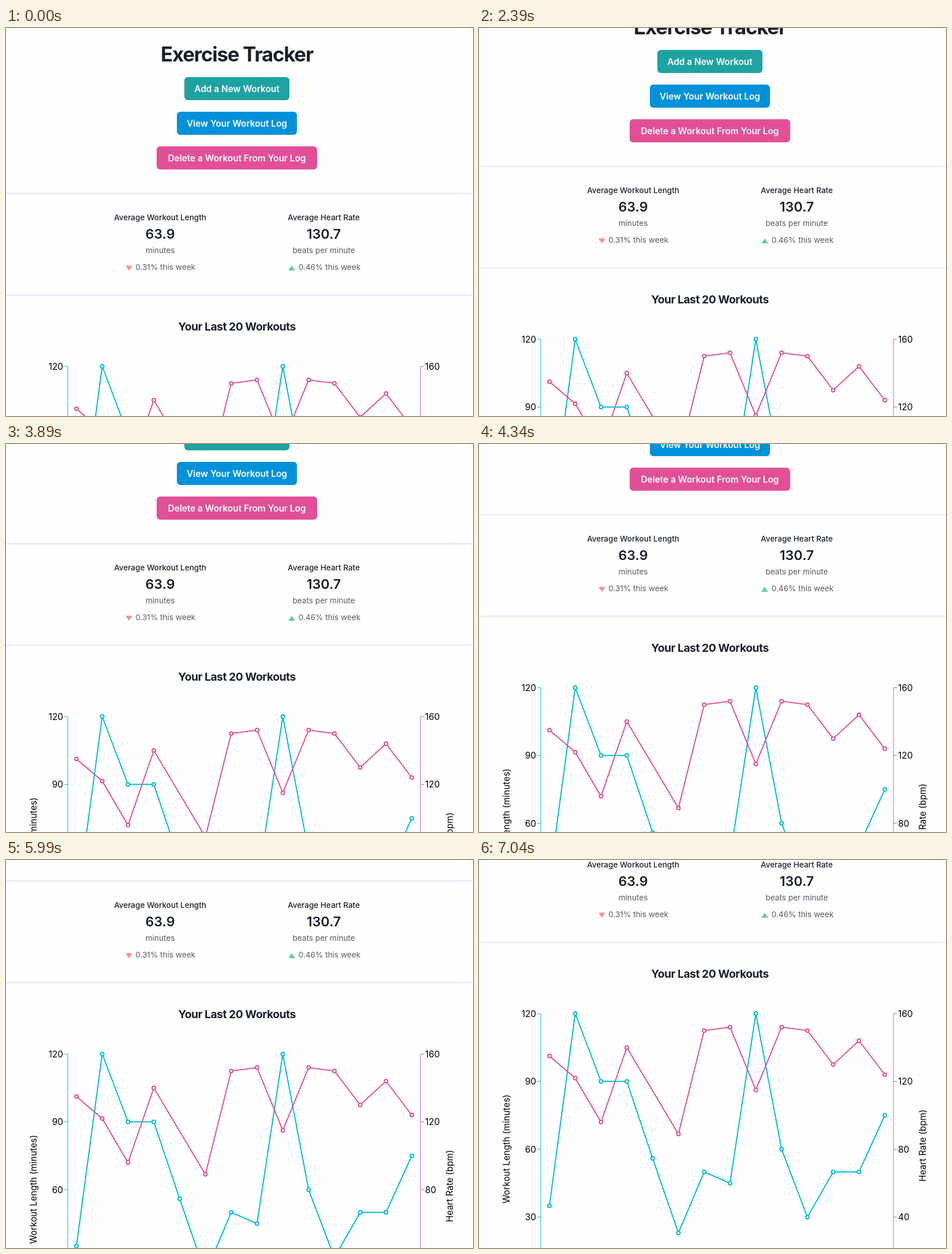
An HTML page that plays this animation: 809 px wide and 672 px high, repeating every 8 s.

```html
<!DOCTYPE html>
<html lang="en">
<head>
<meta charset="utf-8">
<title>Exercise Tracker</title>
<style>
  html, body { margin: 0; width: 100%; height: 100%; overflow: hidden; background: #fefefe; }
  svg { display: block; width: 809px; height: 672px; }
  text { font: 400 15.4px Inter, "Open Sans", sans-serif; font-optical-sizing: none; fill: #000; text-anchor: middle; }
  .title { font-size: 34.8px; font-weight: 700; letter-spacing: -1.2px; fill: #1a202c; }
  .heading { font-size: 19.3px; font-weight: 700; letter-spacing: -.48px; fill: #1a202c; }
  .button { font-weight: 600; fill: #fff; }
  .label { font-size: 13.5px; font-weight: 500; fill: #1a202c; }
  .number { font-size: 23.2px; font-weight: 600; fill: #1a202c; }
  .note { font-size: 13.6px; fill: #555b66; }
  .start { text-anchor: start; }
  .end { text-anchor: end; }
</style>
</head>
<body>
<svg viewBox="0 0 809 672"><g id="page"></g></svg>
<script>
const CYAN = '#00bcd6', PINK = '#e15097';
const TOP = 586, BOTTOM = 1056, LEFT = 107, RIGHT = 718;

const text = (x, y, str, cls = '', extra = '') =>
  `<text x="${x}" y="${y}" class="${cls}" ${extra}>${str}</text>`;

const button = (y, width, color, str) =>
  `<rect x="${400 - width / 2}" y="${y}" width="${width}" height="40" rx="6" fill="${color}"/>` +
  text(400, y + 25.7, str, 'button');

const divider = y => `<rect y="${y}" width="809" height="3" fill="#edecfb"/>`;

function stat(x, label, value, unit, change, rising) {
  const left = x - 60;
  const arrow = rising ? 'M0 420h12l-6-8.5z' : 'M0 411.5h12l-6 8.5z';
  return text(x, 333, label, 'label') + text(x, 365, value, 'number') + text(x, 390, unit, 'note') +
    `<path transform="translate(${rising ? left - 1.5 : left})" d="${arrow}" fill="${rising ? '#68cd9c' : '#ff9088'}"/>` +
    text(rising ? left + 16.2 : left + 17.2, 419, change + ' this week', 'note start');
}

const scaleY = (value, max) => BOTTOM - value / max * (BOTTOM - TOP);

// side is -1 for the left axis, 1 for the right one
function axis(x, side, max, color, label, labelX, labelY) {
  let ticks = '', path = `M${x} ${TOP}V${BOTTOM}`;
  for (let i = 0; i <= 4; i++) {
    const value = max * i / 4, y = scaleY(value, max);
    path += `M${x} ${y}h${6 * side}`;
    ticks += text(x + 8 * side, y + 5.7, value, side < 0 ? 'end' : 'start');
  }
  return `<path d="${path}" stroke="${color}" fill="none"/>` + ticks +
    text(0, 0, label, '', `transform="translate(${labelX} ${labelY}) rotate(-90)"`);
}

function series(values, max, color) {
  const points = values
    .map((v, i) => v === null ? null : [122 + i * 581 / 13, scaleY(v, max)])
    .filter(Boolean);
  return `<g stroke="${color}" stroke-width="2"><polyline fill="none" points="${points.join(' ')}"/>` +
    points.map(([x, y]) => `<circle cx="${x}" cy="${y}" r="3" fill="#fff"/>`).join('') + '</g>';
}

const page = document.getElementById('page');
page.innerHTML =
  text(400, 57.5, 'Exercise Tracker', 'title') +
  button(85, 182, '#1fa2a2', 'Add a New Workout') +
  button(145, 208, '#0091d9', 'View Your Workout Log') +
  button(205, 278, PINK, 'Delete a Workout From Your Log') +
  divider(285) +
  stat(267, 'Average Workout Length', '63.9', 'minutes', '0.31%', false) +
  stat(550.5, 'Average Heart Rate', '130.7', 'beats per minute', '0.46%', true) +
  divider(461) +
  text(400, 524, 'Your Last 20 Workouts', 'heading') +
  axis(LEFT, -1, 120, CYAN, 'Workout Length (minutes)', 53, 820.5) +
  axis(RIGHT, 1, 160, PINK, 'Heart Rate (bpm)', 774, 814.5) +
  series([35, 120, 90, 90, 56, 23, 50, 45, 120, 60, 30, 50, 50, 75], 120, CYAN) +
  series([135, 122, 96, 140, null, 89, 150, 152, 115, 152, 150, 130, 144, 124], 160, PINK);

// Each scroll gesture: start time, then one page offset per step
const LOOP = 8000, STEP = 150;
const gestures = [
  [450, [8, 16]],
  [1790, [17, 21, 28, 37, 47, 57, 66, 76, 90, 102]],
  [3890, [114, 126, 144, 164, 184, 202, 216, 224]],
  [5690, [227, 238, 250, 263, 276, 288, 299, 308, 315, 320]],
];

function scrollAt(time) {
  const gesture = gestures.findLast(([start]) => time >= start);
  if (!gesture) return 0;
  const [start, offsets] = gesture;
  return offsets[Math.min(offsets.length - 1, Math.floor((time - start) / STEP))];
}

function draw() {
  page.setAttribute('transform', `translate(0 ${-scrollAt(performance.now() % LOOP)})`);
  requestAnimationFrame(draw);
}
draw();
</script>
</body>
</html>
```
